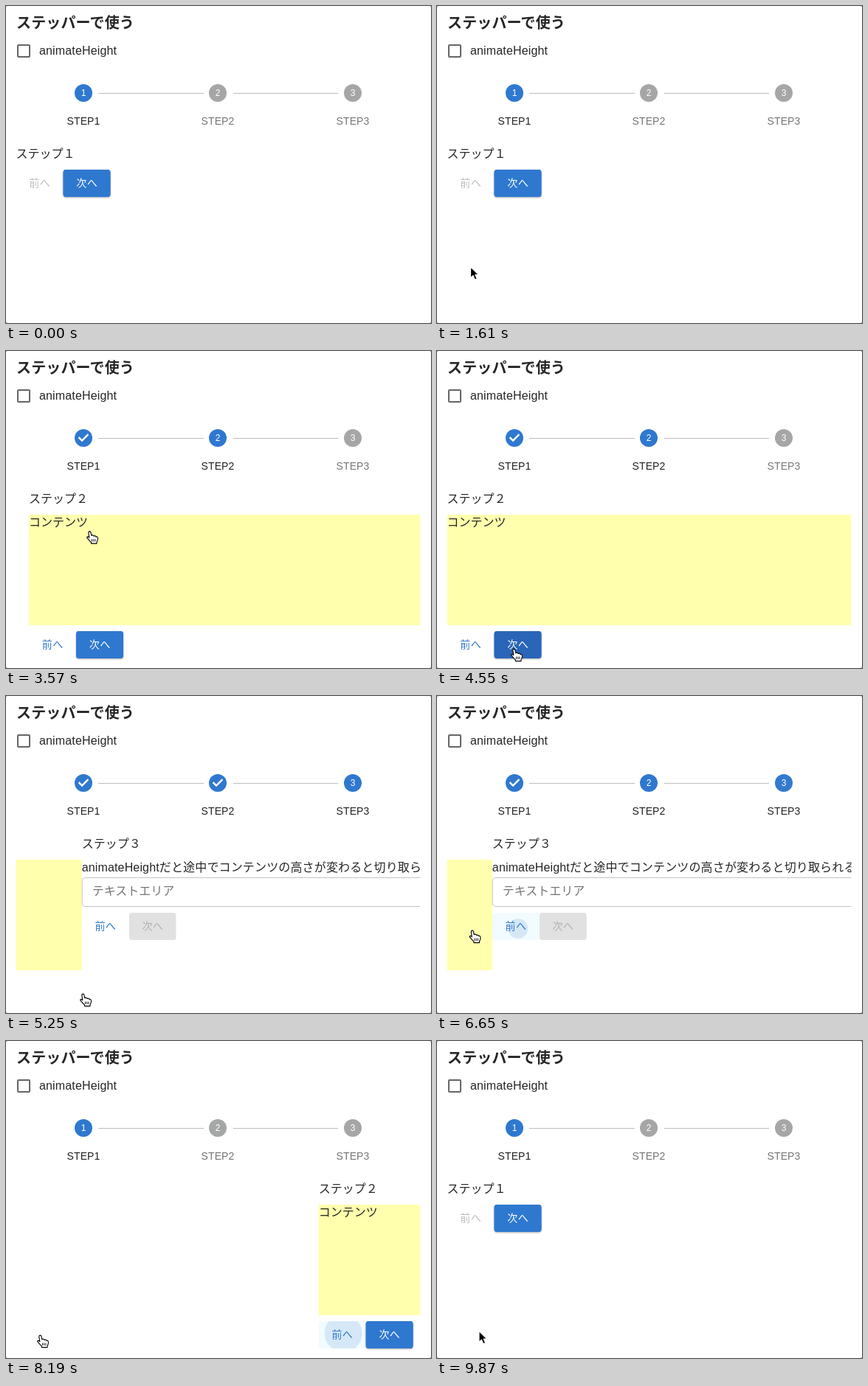
An HTML page for the animation above (9940 ms loop, 576x430 px).

```html
<!DOCTYPE html>
<html lang="ja">
<head>
<meta charset="utf-8">
<title>ステッパー</title>
<style>
  html, body { margin: 0; width: 100%; height: 100%; overflow: hidden; background: #fff; }
  svg { display: block; }
  text { font: 300 16px "Liberation Sans", "Noto Sans CJK JP", "Noto Sans CJK", sans-serif; fill: #262626; }
  .title { font-size: 20px; font-weight: bold; letter-spacing: .15px; }
  .latin { letter-spacing: .15px; }
  .label { font-size: 14px; letter-spacing: .1px; text-anchor: middle; }
  .number { font-size: 12px; fill: #fff; text-anchor: middle; }
  .button { font-size: 14px; letter-spacing: .4px; text-anchor: middle; }
  .raised { filter: drop-shadow(0 1.5px 1.2px rgba(0, 0, 0, .32)); }
</style>
</head>
<body>
<svg id="stage" width="576" height="430" viewBox="0 0 576 430">
  <rect width="576" height="430" fill="#777"/>
  <rect width="576" height="430" rx="2" fill="#fff"/>
  <text class="title" x="14" y="29.7">ステッパーで使う</text>
  <rect x="16" y="53" width="16" height="16" rx="1" fill="none" stroke="#666" stroke-width="2"/>
  <text class="latin" x="45" y="66">animateHeight</text>
  <path d="M125 118.5H268M308 118.5H450" stroke="#bdbdbd"/>
  <g id="header"></g>
  <svg id="view" x="13.5" y="180" width="548" height="250" viewBox="0 180 548 250"></svg>
  <g id="ring" fill="none">
    <circle r="29.3" stroke="#fff" stroke-width="5"/>
    <circle r="29.3" stroke="#000" stroke-width="3"/>
  </g>
  <g id="cursor">
    <path id="arrow" d="M0 0V14.8L3.4 11.6L5.8 17.2L8.6 16L6.2 10.6H10.8Z" fill="#000" stroke="#fff" stroke-width="1.1" stroke-linejoin="round"/>
    <g id="hand" transform="translate(0 .6)" stroke="#000" stroke-width="1.1" stroke-linejoin="round">
      <path d="M-1.2 9L-2.2 2.6Q-2.2 .6-.8 .5Q.6 .5 1 2.2L1.8 6.2Q2.6 5.2 4 5.8Q4.8 6.1 5 7Q6 6.2 7.2 6.9Q7.9 7.3 8 8Q9.2 7.5 10 8.4Q10.7 9.2 10.4 11.2Q10.2 13.2 9 15V17H1.4V15.4Q-.8 13.6-2 11.8L-4.2 9.3Q-4.6 7.9-3.2 7.8Q-2.2 7.9-1.2 9Z" fill="#fff"/>
      <path d="M2.5 11V14.4M4.7 11V14.4M6.9 11V14.4" fill="none" stroke-width=".9"/>
    </g>
  </g>
</svg>
<script>
const LOOP = 9940, TICK = 70, WIDTH = 548, VIEW_X = 13.5;
const BLUE = [47, 120, 207], GREY = [166, 166, 166], INK = [33, 33, 33], MUTED = [117, 117, 117];
const byId = id => document.getElementById(id);

function add(parent, tag, attrs, content) {
  const node = document.createElementNS('http://www.w3.org/2000/svg', tag);
  for (const name in attrs) node.setAttribute(name, attrs[name]);
  if (content) node.textContent = content;
  return parent.appendChild(node);
}

const set = (node, name, value) => node.setAttribute(name, value);
const show = (node, visible) => set(node, 'visibility', visible ? 'visible' : 'hidden');
const clamp = v => Math.min(1, Math.max(0, v));
const mix = (a, b, k) => a + (b - a) * k;
const blend = (a, b, k) => `rgb(${a.map((v, i) => Math.round(mix(v, b[i], k)))})`;

function bezier(x1, y1, x2, y2) {
  const curve = (a, b, s) => 3 * (1 - s) ** 2 * s * a + 3 * (1 - s) * s * s * b + s ** 3;
  return x => {
    x = clamp(x);
    let lo = 0, hi = 1;
    for (let i = 0; i < 24; i++) {
      const mid = (lo + hi) / 2;
      if (curve(x1, x2, mid) < x) lo = mid; else hi = mid;
    }
    return curve(y1, y2, (lo + hi) / 2);
  };
}
const swipe = bezier(.15, .3, .25, 1);
const standard = bezier(.4, 0, .2, 1);
const smooth = k => k * k * (3 - 2 * k);

// Step indicators
const header = byId('header');
const steps = [105, 287, 470].map((x, i) => ({
  disc: add(header, 'circle', { cx: x, cy: 118, r: 12 }),
  number: add(header, 'text', { class: 'number', x, y: 122.3 }, String(i + 1)),
  check: add(header, 'path', {
    d: 'M10 17l-5-5 1.4-1.4 3.6 3.6 7.6-7.6L19 8z', fill: '#fff', stroke: '#fff',
    'stroke-width': .6, transform: `translate(${x - 12} 106)`
  }),
  label: add(header, 'text', { class: 'label', x, y: 161 }, 'STEP' + (i + 1))
}));

// Sliding panels
const view = byId('view');

function makeButton(panel, x, y, caption, { fill, ink, raised }) {
  if (raised) add(panel, 'rect', { class: 'raised', x, y, width: 64, height: 37, rx: 4, fill });
  const box = add(panel, 'svg', { x, y, width: 64, height: 37 });
  const face = add(box, 'rect', { width: 64, height: 37, rx: 4, fill });
  const ripple = add(box, 'circle', { fill: raised ? '#fff' : '#2f6fc4', r: 0 });
  add(box, 'text', { class: 'button', x: 32.2, y: 23, style: `fill:${ink}` }, caption);
  return { x, y, fill, face, ripple };
}

const flat = { fill: '#fff', ink: '#2f78cf' };
const flatOff = { fill: '#fff', ink: '#bdbdbd' };
const solid = { fill: '#2f78cf', ink: '#fff', raised: true };
const solidOff = { fill: '#e1e1e1', ink: '#b2b2b2' };

const panels = ['１', '２', '３'].map((digit, i) => {
  const group = add(view, 'g');
  add(group, 'text', { x: 0, y: 206 }, 'ステップ' + digit);
  if (i === 1) {
    add(group, 'rect', { y: 222, width: WIDTH, height: 150, fill: '#ffffad' });
    add(group, 'text', { x: 0, y: 238 }, 'コンテンツ');
  }
  if (i === 2) {
    add(group, 'text', { class: 'latin', x: 0, y: 238 },
      'animateHeightだと途中でコンテンツの高さが変わると切り取られる');
    add(group, 'rect', { x: .5, y: 246.5, width: WIDTH - 1, height: 39, rx: 4, fill: 'none', stroke: '#c4c4c4' });
    add(group, 'text', { x: 14, y: 270, style: 'fill:#757575' }, 'テキストエリア');
  }
  const y = [222, 380, 294][i];
  return {
    group,
    prev: makeButton(group, 0, y, '前へ', i ? flat : flatOff),
    next: makeButton(group, 64, y, '次へ', i < 2 ? solid : solidOff)
  };
});

const clicks = [
  { press: 3290, slide: 3310, from: 0, to: 1, x: 114, y: 243.5 },
  { press: 4900, slide: 5083, from: 1, to: 2, x: 105, y: 403, hover: 4410, tint: '#2a65b8' },
  { press: 6510, slide: 6633, from: 2, to: 1, x: 48.5, y: 317, hover: 6160, tint: '#f2fbff' },
  { press: 7980, slide: 8057, from: 1, to: 0, x: 47, y: 398, hover: 7630, tint: '#f2fbff' }
];
for (const c of clicks) c.button = panels[c.from][c.to > c.from ? 'next' : 'prev'];

// Pointer path: time, x, y
const path = [
  [280, 148, 270], [800, 112, 338], [1190, 46, 409], [1400, 41, 398], [1750, 48, 330],
  [2100, 72, 259], [2240, 72, 259], [2450, 114, 240], [2520, 114, 240], [2660, 115, 243],
  [2730, 115, 243], [2800, 114, 243.5], [3780, 114, 243.5], [4200, 120, 340], [4550, 105, 403],
  [5880, 105, 403], [6160, 40, 308], [6300, 48.5, 317], [7140, 48.5, 317], [7500, 42, 366],
  [7840, 47, 398], [8750, 47, 398], [9170, 54, 273], [9590, 54, 394], [9730, 54, 394],
  [9870, 57, 393.5]
];
const handTimes = [[2800, 3850], [4410, 5670], [6160, 7210], [7630, 8610]];

function pointerAt(t) {
  const i = path.findIndex(p => p[0] > t);
  if (i < 0) return path[path.length - 1].slice(1);
  if (i === 0) return path[0].slice(1);
  const [t0, x0, y0] = path[i - 1], [t1, x1, y1] = path[i];
  const k = smooth((t - t0) / (t1 - t0));
  return [mix(x0, x1, k), mix(y0, y1, k)];
}

function drawRipple(c, t) {
  const { button } = c, age = t - c.press + 15;
  const active = t >= c.press && age < 1100;
  if (!active) return;
  const x = c.x - VIEW_X - button.x, y = c.y - button.y - 1.5;
  const radius = Math.hypot(Math.max(x, 64 - x), Math.max(y, 37 - y)) + 1;
  const grow = standard(age / 550);
  const fade = 1 - standard((t - c.slide) / 550);
  set(button.ripple, 'cx', x);
  set(button.ripple, 'cy', y);
  set(button.ripple, 'r', radius * grow);
  set(button.ripple, 'opacity', mix(.1, .23, grow) * fade);
}

function render(t) {
  const last = clicks.filter(c => c.slide <= t).pop() || { slide: -1000, from: 0, to: 0 };
  const position = mix(last.from, last.to, swipe((t - last.slide) / 350));
  const tone = standard((t - last.slide) / 150);

  steps.forEach((s, i) => {
    const was = i <= last.from, is = i <= last.to, done = i < last.to;
    set(s.disc, 'fill', blend(was ? BLUE : GREY, is ? BLUE : GREY, tone));
    s.label.style.fill = blend(was ? INK : MUTED, is ? INK : MUTED, tone);
    show(s.check, done);
    show(s.number, !done);
  });

  panels.forEach((p, i) => {
    set(p.group, 'transform', `translate(${(i - position) * WIDTH} 0)`);
    for (const b of [p.prev, p.next]) {
      set(b.face, 'fill', b.fill);
      set(b.ripple, 'opacity', 0);
    }
  });

  for (const c of clicks) {
    if (c.hover <= t && t < c.slide + 350) set(c.button.face, 'fill', c.tint);
    drawRipple(c, t);
  }

  const [x, y] = pointerAt(t);
  const isHand = handTimes.some(([a, b]) => t >= a && t < b);
  set(byId('cursor'), 'transform', `translate(${x} ${y})`);
  show(byId('hand'), isHand);
  show(byId('arrow'), !isHand && t >= 350);

  set(byId('ring'), 'transform', `translate(${x} ${y})`);
  show(byId('ring'), clicks.some(c => t >= c.press && t < c.slide));
}

const start = performance.now();
function frame() {
  const t = (performance.now() - start) % LOOP;
  render(Math.floor(t / TICK) * TICK);
  requestAnimationFrame(frame);
}
frame();
</script>
</body>
</html>
```
